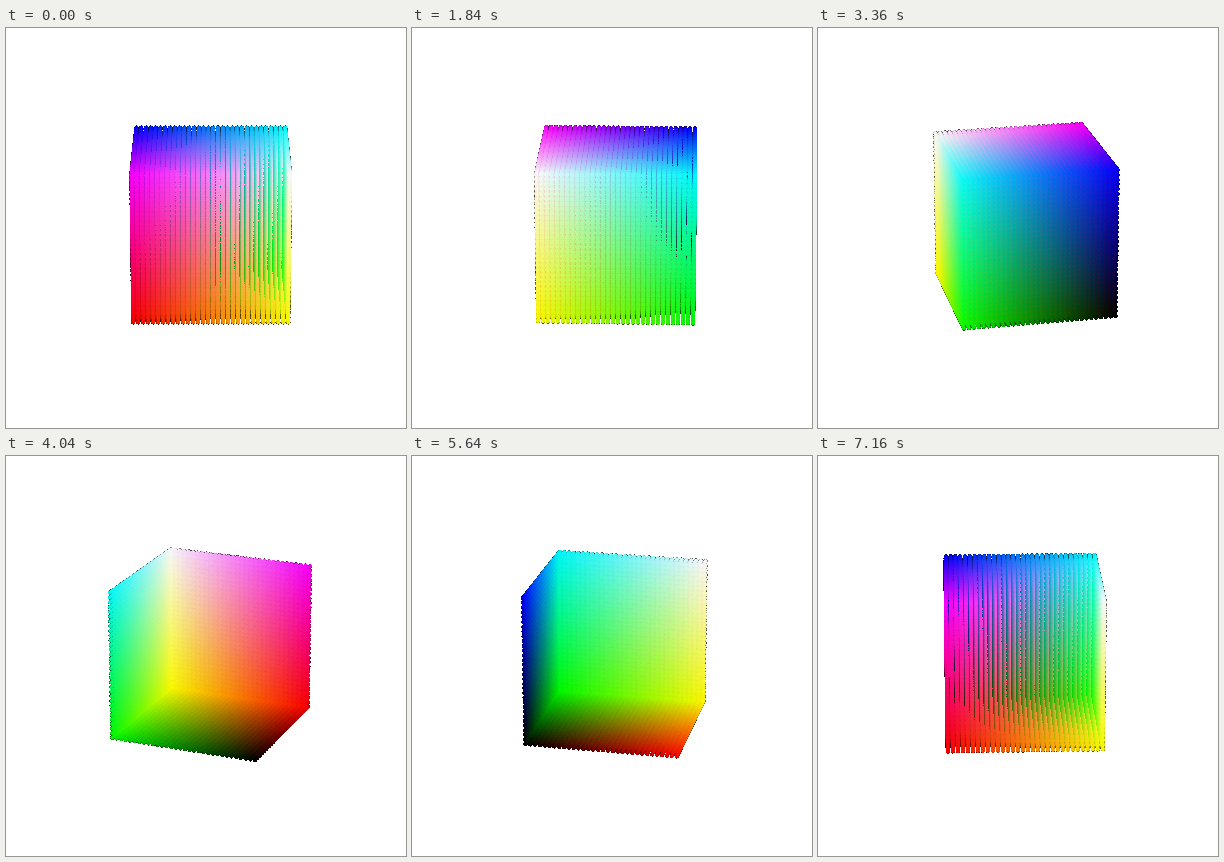
Write a matplotlib script that moves like this. It is 400 px wide and 400 px high and loops after 7.2 s.

```python
import numpy as np
import matplotlib.pyplot as plt
from matplotlib.animation import FuncAnimation

SIZE = 400
FRAMES = 180
ELEV = np.radians(20)
DIST = 10
SCALE = SIZE / 0.185          # focal scale in pixels
CX, CY = SIZE * 0.095 / 0.185, SIZE * 0.09 / 0.185
RADIUS = 2.2                  # dot radius in pixels

# Dots are painted in lattice order (green, red, blue), not by depth.
level = np.arange(0, 256, 8)
g, r, b = (a.ravel() for a in np.meshgrid(level, level, level, indexing="ij"))
rgb = np.stack([r, g, b], axis=1).astype(np.float32)
x, y, z = (((v - 125) / 353).astype(np.float32) for v in (r, g, b))

near_px = np.arange(-2, 3)
KX, KY = (k.ravel() for k in np.meshgrid(near_px, near_px))
dot_id = np.repeat(np.arange(len(rgb)), KX.size).reshape(-1, KX.size)


def project(azim):
    c, s = np.cos(azim), np.sin(azim)
    near = x * c + y * s
    side = y * c - x * s
    up = z * np.cos(ELEV) - near * np.sin(ELEV)
    depth = DIST - near * np.cos(ELEV) - z * np.sin(ELEV)
    return CX + SCALE * side / depth, CY - SCALE * up / depth


def render(i):
    px, py = project(2 * np.pi * i / FRAMES)
    col, row = np.floor(px).astype(int), np.floor(py).astype(int)
    dx = (col + 0.5 - px).astype(np.float32)[:, None] + KX.astype(np.float32)
    dy = (row + 0.5 - py).astype(np.float32)[:, None] + KY.astype(np.float32)
    cover = RADIUS + 0.5 - np.sqrt(dx * dx + dy * dy)
    pixel = (row * SIZE + col)[:, None] + (KY * SIZE + KX)

    # Soft edges add up to opacity; the last dot on a pixel gives its colour.
    soft = cover > 0.02
    hit = pixel[soft]
    haze = np.log1p(-np.minimum(cover[soft], 0.99))
    alpha = 1 - np.exp(np.bincount(hit, haze, SIZE * SIZE))
    top = np.zeros(SIZE * SIZE, int)
    top[hit] = dot_id[soft]
    solid = cover > 0.5
    top[pixel[solid]] = dot_id[solid]

    # Half-opaque rims turn dark, fainter ones vanish.
    img = rgb[top] * alpha[:, None] ** 2
    img[alpha < 0.5] = 255
    return img.astype(np.uint8).reshape(SIZE, SIZE, 3)


fig = plt.figure(figsize=(4, 4), dpi=100, facecolor="white")
ax = fig.add_axes([0, 0, 1, 1])
ax.axis("off")
picture = ax.imshow(render(0), interpolation="nearest", aspect="auto")


def update(i):
    picture.set_data(render(i))
    return [picture]


anim = FuncAnimation(fig, update, frames=FRAMES, interval=7200 / FRAMES,
                     repeat=True)
plt.show()
```
